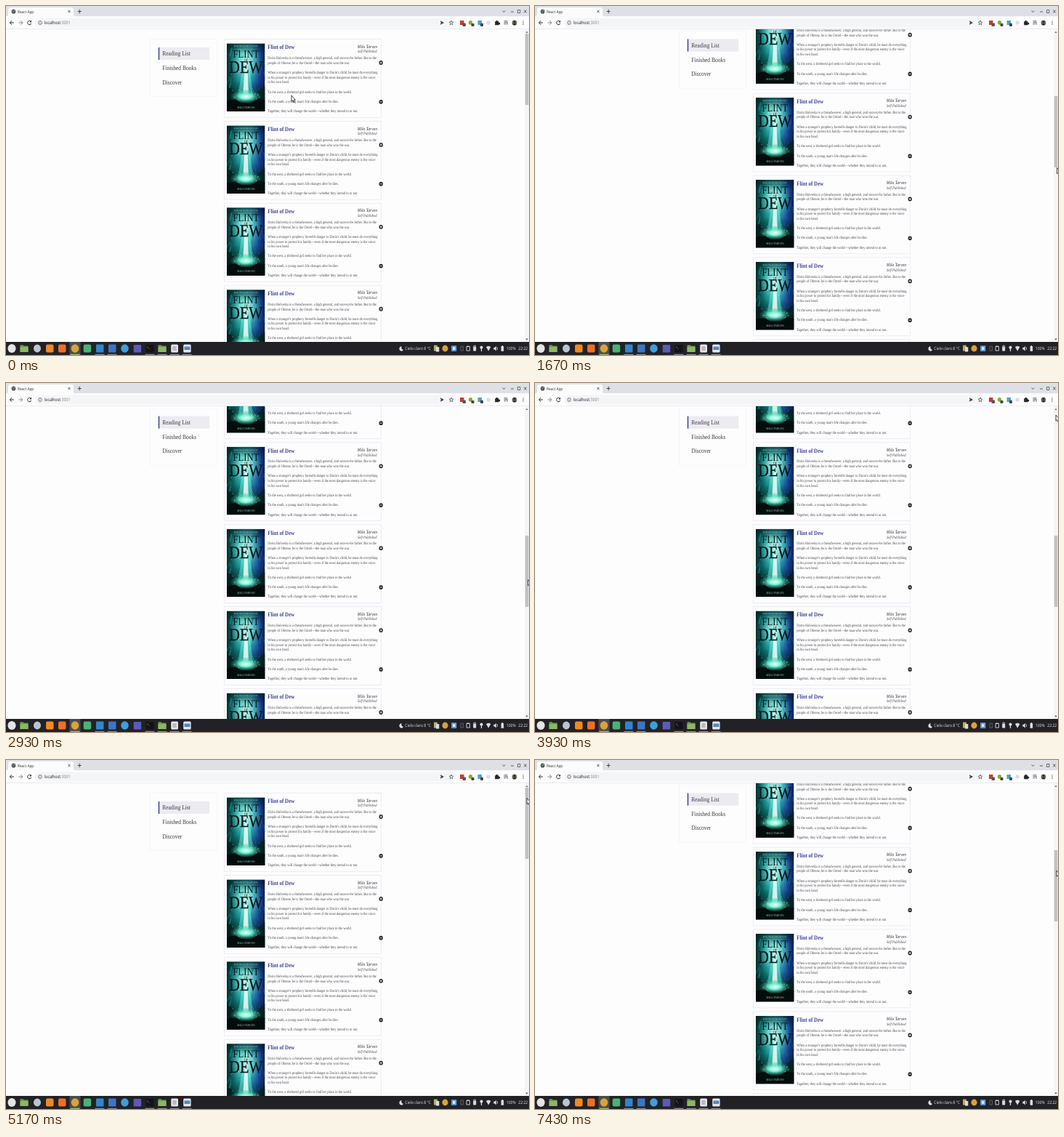
Write an HTML page that moves like this. It is 720x480 px and loops after 7.46 s.

```html
<!DOCTYPE html>
<html lang="en">
<head>
<meta charset="utf-8">
<title>Reading list</title>
<style>
  html, body { margin: 0; width: 100%; height: 100%; overflow: hidden; background: #fdfdfe; }
  svg { display: block; width: 720px; height: 480px; }
  text { text-rendering: geometricPrecision; white-space: pre; }
  .serif { font-family: "Liberation Serif", Tinos, serif; }
  .sans { font-family: "Noto Sans", "Open Sans", sans-serif; }
</style>
</head>
<body>
<svg id="stage" viewBox="0 0 720 480" xmlns="http://www.w3.org/2000/svg">
  <defs>
    <clipPath id="view"><rect y="31.5" width="714" height="430.5"/></clipPath>
    <clipPath id="coverClip"><rect width="52.5" height="93.5"/></clipPath>
    <linearGradient id="sky">
      <stop offset="0" stop-color="#04302f"/>
      <stop offset=".3" stop-color="#0f8583"/>
      <stop offset=".62" stop-color="#1a8ba0"/>
      <stop offset=".85" stop-color="#173f8c"/>
      <stop offset="1" stop-color="#0a2050"/>
    </linearGradient>
    <linearGradient id="depth" x1="0" y1="0" x2="0" y2="1">
      <stop offset="0" stop-color="#02100f" stop-opacity=".55"/>
      <stop offset=".15" stop-color="#02100f" stop-opacity="0"/>
      <stop offset=".55" stop-color="#02100f" stop-opacity="0"/>
      <stop offset=".9" stop-color="#010807"/>
    </linearGradient>
    <radialGradient id="halo">
      <stop offset="0" stop-color="#d2fbf0"/>
      <stop offset=".45" stop-color="#6fd9d0" stop-opacity=".8"/>
      <stop offset="1" stop-color="#1d8a98" stop-opacity="0"/>
    </radialGradient>
    <radialGradient id="glow">
      <stop offset="0" stop-color="#fbffff"/>
      <stop offset=".35" stop-color="#7df3d4"/>
      <stop offset="1" stop-color="#0f9a7a" stop-opacity="0"/>
    </radialGradient>
  </defs>
</svg>
<script>
const LOOP = 7460, PITCH = 112.9, CARDS = 13;
const PIXEL_ASPECT = 27 / 32;   // the whole screen is a 16:9 desktop shown at 3:2
const SVG = "http://www.w3.org/2000/svg";
const stage = document.getElementById("stage");

function add(parent, tag, attrs = {}, content) {
  const el = document.createElementNS(SVG, tag);
  for (const k in attrs) el.setAttribute(k, attrs[k]);
  if (content !== undefined) el.textContent = content;
  parent.appendChild(el);
  return el;
}
const group = (parent, attrs) => add(parent, "g", attrs);
const rect = (p, x, y, width, height, fill, rx = 0) => add(p, "rect", { x, y, width, height, fill, rx });
const disc = (p, cx, cy, r, fill) => add(p, "ellipse", { cx, cy, rx: r * .93, ry: r, fill });
const shape = (p, d, fill, opacity = 1) => add(p, "path", { d, fill, opacity });
const line = (p, d, stroke, width = 1, extra = {}) =>
  add(p, "path", { d, stroke, "stroke-width": width, fill: "none", ...extra });
const label = (p, x, y, size, fill, str, extra = {}) =>
  add(p, "text", {
    class: "serif", "font-size": size, fill,
    transform: `translate(${x} ${y}) scale(${PIXEL_ASPECT} 1)`, ...extra
  }, str);

function random(seed) {
  return () => (seed = (seed * 16807) % 2147483647) / 2147483647;
}

// ---- book cover ----
function drawCover(parent, x, y) {
  const g = group(parent, { transform: `translate(${x} ${y})`, "clip-path": "url(#coverClip)" });
  const rnd = random(77);
  rect(g, 0, 0, 52.5, 93.5, "url(#sky)");
  add(g, "ellipse", { cx: 26, cy: 26, rx: 24, ry: 36, fill: "url(#halo)" });
  rect(g, 0, 0, 52.5, 93.5, "url(#depth)");
  for (let i = 0; i < 40; i++) {
    const sx = rnd() * 52, sy = 6 + rnd() * 58, h = 3 + rnd() * 12;
    const hue = sx > 34 ? "#2f62c8" : i % 3 ? "#22b0b0" : "#a4f0dc";
    line(g, `M${sx} ${sy}l${(sx - 26) * .12} ${h}`, hue, .8, { opacity: .55 });
  }
  shape(g, "M21 36L32 36L36 74L15 74Z", "#5fe8cf", .55);
  shape(g, "M24.5 34L28.5 34L30 74L22 74Z", "#eafffa", .85);
  shape(g, "M0 60L6 62L11 69L17 75L0 80ZM52.5 58L47 62L42 68L36 75L52.5 80Z", "#04211f", .85);
  add(g, "ellipse", { cx: 26, cy: 73, rx: 22, ry: 10, fill: "url(#glow)" });
  shape(g, "M0 79L12 77L20 82L33 82L43 76L52.5 78V93.5H0Z", "#020d0c");
  for (let i = 0; i < 22; i++) {
    const sx = 7 + rnd() * 38, sy = 62 + rnd() * 17;
    shape(g, `M${sx} ${sy}h1.4l-.5 1.3z`, "#86f7d8", .8);
  }
  const mid = { "text-anchor": "middle" };
  const ink = "#06181c";
  label(g, 26.2, 4.8, 2.7, "#b8d8d4", "BOOK ONE OF THE LONG TALE", mid);
  label(g, 26.4, 19, 15, ink, "FLINT", mid);
  label(g, 26.4, 24, 5, ink, "OF", mid);
  label(g, 26.4, 40, 24, ink, "DEW", { ...mid, stroke: ink, "stroke-width": .35 });
  label(g, 26.4, 89, 4.3, "#b4c4c0", "MILO TARVEN", mid);
}

// ---- one list entry ----
const BLURB = [
  [0, "Dorin Halveska is a threadweaver, a high general, and soon-to-be father. But to the"],
  [1, "people of Obrene, he is the Ostrel\u2014the man who won the war."],
  [3, "When a stranger's prophecy foretells danger to Dorin's child, he must do everything"],
  [4, "in his power to protect his family\u2014even if the most dangerous enemy is the voice"],
  [5, "in his own head."],
  [7, "To the west, a sheltered girl seeks to find her place in the world."],
  [9, "To the south, a young man's life changes after he dies."],
  [11, "Together, they will change the world\u2014whether they intend to or not."]
];

function drawButton(p, x, y, plus) {
  disc(p, x, y, 2.9, "#2c2c30");
  line(p, `M${x - 1.4} ${y}h2.8` + (plus ? `M${x} ${y - 1.5}v3` : ""), "#ffffff", .8);
}

function drawCard(parent, top) {
  const g = group(parent, { transform: `translate(0 ${top})` });
  add(g, "rect", { x: 300.5, y: 45.5, width: 216, height: 107.8, fill: "none", stroke: "#e8e8f2", "stroke-width": .8 });
  drawCover(g, 304, 51.5);
  label(g, 360.3, 59.3, 8.32, "#40449c", "Flint of Dew", { "font-weight": 700 });
  const right = { "text-anchor": "end", "font-style": "italic" };
  label(g, 511, 57.6, 6.6, "#333338", "Milo Tarven", right);
  label(g, 510.6, 64.3, 5.5, "#48484e", "Self Published", right);
  for (const [row, str] of BLURB) label(g, 360.3, 73.2 + row * 6.64, 5.36, "#48484e", str);
  drawButton(g, 516.2, 78, true);
  drawButton(g, 516.2, 131.8, false);
}

// ---- page ----
rect(stage, 0, 0, 720, 480, "#fdfdfe");
const view = group(stage, { "clip-path": "url(#view)" });
const list = group(view);
for (let i = 0; i < CARDS; i++) drawCard(list, i * PITCH);

const side = group(view);
add(side, "rect", { x: 198.5, y: 45.5, width: 92, height: 79, fill: "none", stroke: "#f5f5fa", "stroke-width": .8 });
rect(side, 209.7, 57, 70.5, 17, "#ebebf0");
rect(side, 209.7, 57, 1.6, 17, "#4c4e96");
["Reading List", "Finished Books", "Discover"].forEach((s, i) =>
  label(side, 215.3, 68.4 + i * 19.6, 8.89, "#3c3c42", s));

// ---- scrollbar ----
rect(stage, 714, 31.5, 6, 430.5, "#f5f5f7");
shape(stage, "M715.3 37L717 34.8L718.7 37Z", "#77777c");
shape(stage, "M715.3 457.6L717 459.8L718.7 457.6Z", "#55555a");
const thumb = rect(stage, 714.8, 38, 4.6, 98, "#c1c1c4");

// ---- browser frame ----
function drawBrowser() {
  const g = group(stage), ink = "#3c3d40";
  const sans = { class: "sans" };
  rect(g, 0, 0, 720, 14.5, "#dee0e5");
  shape(g, "M0 14.5Q3 14.5 3 11V5Q3 2 6 2H90Q93 2 93 5V11Q93 14.5 96 14.5Z", "#fcfcfd");
  rect(g, 0, 14.2, 720, 17.3, "#fdfdfe");
  rect(g, 40, 16.5, 580, 13, "#f4f5f7", 6.5);
  rect(g, 0, 31, 720, .6, "#dfe0e4");

  disc(g, 10.5, 7.5, 3.1, "#4d4e52");
  line(g, "M8.6 6.3q1.5 1 1.8 2.4M11 5.2q-.4 1.2 1.8 1.8", "#d8d9dc", .7);
  label(g, 16, 9.8, 5.6, ink, "React App", sans);
  line(g, "M85.5 5.8l3 3.4m0-3.4l-3 3.4", ink, .8);
  line(g, "M98.7 7.5h5M101.2 4.7v5.6", ink, .9);
  line(g, "M683.7 6.5l1.8 2l1.8-2M695 8h4M713.3 5.5l3.2 4m0-4l-3.2 4", ink, .8);
  line(g, "M704.5 5.5h3.4v4h-3.4z", ink, .7);

  line(g, "M10.8 23H5.6M8 20.2L5.4 23L8 25.8", "#2c2c30", 1);
  line(g, "M17.4 23h5.2M20.2 20.2L22.8 23L20.2 25.8", "#85868a", 1);
  line(g, "M34.3 21.4A2.5 2.8 0 1 0 34.6 24", "#2c2c30", 1);
  shape(g, "M35 19.8V22.6H32.3Z", "#2c2c30");
  line(g, "M44.7 23a2.3 2.6 0 1 0 4.6 0a2.3 2.6 0 1 0-4.6 0M47 22.8v1.6M47 21.4v.6", "#55565a", .7);
  const url = label(g, 53, 25.3, 6.2, "#26272b", "", sans);
  add(url, "tspan", {}, "localhost");
  add(url, "tspan", { fill: "#85868a" }, ":3001");

  shape(g, "M598 20.3L603 23L598 25.7L598.6 23.3L601 23L598.6 22.7Z", "#333438");
  line(g, "M613 20l.8 2.1l2 .1l-1.6 1.4l.6 2.2l-1.8-1.3l-1.8 1.3l.6-2.2l-1.6-1.4l2-.1z", "#44454a", .7);
  rect(g, 625, 20, 5.5, 6, "#d13a2c");
  rect(g, 628.5, 23.5, 4.5, 4.5, "#55555a", 1);
  disc(g, 639.5, 22.8, 2.9, "#8cab32");
  rect(g, 640.5, 24, 4, 4, "#3d4a3c", 1);
  rect(g, 649.5, 20, 5.5, 6, "#4ba4d0");
  rect(g, 653, 23.8, 4, 4.2, "#45454a", 1);
  disc(g, 664, 23, 2.8, "#dcdde0");
  shape(g, "M673.2 21.3h1.4a1.2 1.3 0 1 1 2.3 0h1.6v1.7a1.2 1.3 0 1 1 0 2.3v1h-5.3z", "#252529");
  line(g, "M685.5 20.8h5M685.5 22.8h5M685.5 24.8h2.6M690 22.8v3", "#333438", .8);
  disc(g, 700, 23, 3.6, "#6d675a");
  disc(g, 700, 22, 1.4, "#2c2926");
  shape(g, "M697.5 25.6Q700 22.6 702.5 25.6Q700 27.6 697.5 25.6Z", "#2c2926");
  for (let i = 0; i < 3; i++) disc(g, 712, 20.8 + i * 2.2, .65, "#333438");
}
drawBrowser();

// ---- desktop panel ----
function folder(g, x) {
  shape(g, `M${x - 5.5} 466.2h4l1.3 1.4h5.7v8.4h-11z`, "#6d9a4c");
  rect(g, x - 5.5, 469, 11, 7, "#8cb865", .6);
}

function drawPanel() {
  const g = group(stage), pale = "#dcdce0";
  rect(g, 0, 462, 720, 18, "#222226");
  rect(g, 87.5, 462, 15, 18, "#4c4c50");
  for (const x of [95, 129, 146, 198, 215, 232, 249])
    rect(g, x - 6.5, 478.8, 13, 1.2, x === 95 ? "#9fc063" : "#8b8b90");

  disc(g, 8, 471, 6, "#e4e4e6");
  folder(g, 25);
  disc(g, 43, 471, 5.4, "#b8c6d2");
  rect(g, 55, 465.5, 10.5, 11, "#f08a24", 2);
  rect(g, 72, 465.5, 10.5, 11, "#ed6f2a", 2);
  disc(g, 95, 471, 5.7, "#d9a33a");
  rect(g, 106.7, 465.5, 10.5, 11, "#49b375", 2);
  rect(g, 124, 465.5, 10.5, 11, "#2f86d0", 1);
  rect(g, 141, 465.5, 10.5, 11, "#3d74c4", 1);
  disc(g, 163.5, 471, 5.7, "#3d9fdc");
  rect(g, 175.7, 466, 10.5, 10.5, "#5c5bb8", 1);
  rect(g, 192.5, 466, 11, 10.5, "#141417", 1);
  label(g, 194, 471.4, 4.6, "#c9c9cc", ">_", { class: "sans" });
  folder(g, 215);
  rect(g, 227.2, 465.5, 9.8, 11, "#e4e4e8", 1.5);
  line(g, "M229.5 469h5M229.5 471h5M229.5 473h5", "#77777c", .8);
  rect(g, 244.2, 465.5, 10.4, 11, "#e2e6ec", 1.5);
  rect(g, 245.5, 468.5, 7.8, 4.5, "#5486c8");

  shape(g, "M544.6 468a3 3.3 0 1 0 2.4 5a3.4 3.6 0 0 1-2.4-5z", pale);
  const sans = { class: "sans" };
  label(g, 549.3, 473.2, 6, pale, "Cielo claro 8 °C", sans);
  rect(g, 589, 466.5, 5, 8, "#b9a866", .6);
  rect(g, 592, 469, 4.3, 6.5, pale, .6);
  disc(g, 604.5, 471, 4.4, "#d9a33a");
  rect(g, 613, 467, 7.4, 8, "#5b93d6", 1);
  rect(g, 615, 469, 3.5, 4, "#e6e9ee");
  line(g, "M626 468h3.4v6h-3.4z", "#6c6c70", .8);
  line(g, "M634 468.5h4.4v5.5h-4.4zM635.2 467v1.5M637.2 467v1.5", pale, .9);
  rect(g, 643.2, 468.5, 4, 6, pale, .7);
  line(g, "M644 468.6v-1.5h2.4v1.5", pale, .8);
  disc(g, 654.5, 469.6, 2.2, pale);
  rect(g, 653.9, 471, 1.2, 4, pale);
  shape(g, "M661 469Q664.2 466.4 667.4 469L664.2 474.5Z", pale);
  shape(g, "M671.3 469.7h1.5l2-2v6.8l-2-2h-1.5z", pale);
  line(g, "M676 469q1.4 2 0 4", pale, .8);
  rect(g, 681.6, 468, 3.6, 6.8, pale, .5);
  rect(g, 682.6, 467, 1.6, 1.2, pale);
  label(g, 688.8, 473.2, 6, pale, "100%", sans);
  label(g, 705.3, 473.2, 6, pale, "22:22", sans);
}
drawPanel();

const cursor = add(stage, "path", {
  d: "M0 0V8.2L1.8 6.7L3 9.6L4.3 9L3.1 6.2H5.4Z",
  fill: "#f8f8fa", stroke: "#1a1a1c", "stroke-width": .8
});

// ---- motion: [time, value...] with eased spans between rows ----
const SCROLL = [
  [0, 0], [1350, 0], [1600, 377], [2650, 377], [2900, 754],
  [4060, 754], [4310, 377], [4563, 377], [4813, 0], [6750, 0], [7000, 377]
];
const POINTER = [
  [0, 393, 123], [100, 393, 123], [1050, 718.6, 222.5], [2050, 718.6, 222.5],
  [2400, 718.6, 270.5], [3150, 718.6, 270.5], [3750, 717, 44],
  [5000, 717, 44], [6000, 718, 152]
];

function sample(rows, t) {
  const next = rows.findIndex(r => r[0] > t);
  if (next < 0) return rows[rows.length - 1].slice(1);
  const a = rows[next - 1], b = rows[next];
  const p = (t - a[0]) / (b[0] - a[0]), k = p * p * (3 - 2 * p);
  return a.slice(1).map((v, i) => v + (b[i + 1] - v) * k);
}

function render(t) {
  const [scroll] = sample(SCROLL, t);
  const [x, y] = sample(POINTER, t);
  list.setAttribute("transform", `translate(0 ${-scroll})`);
  side.setAttribute("transform", `translate(0 ${-Math.min(scroll, 11.4)})`);
  thumb.setAttribute("y", 38 + scroll * .228);
  cursor.setAttribute("transform", `translate(${x} ${y})`);
}

const start = performance.now();
function tick() {
  render((performance.now() - start) % LOOP);
  requestAnimationFrame(tick);
}
tick();
</script>
</body>
</html>
```
